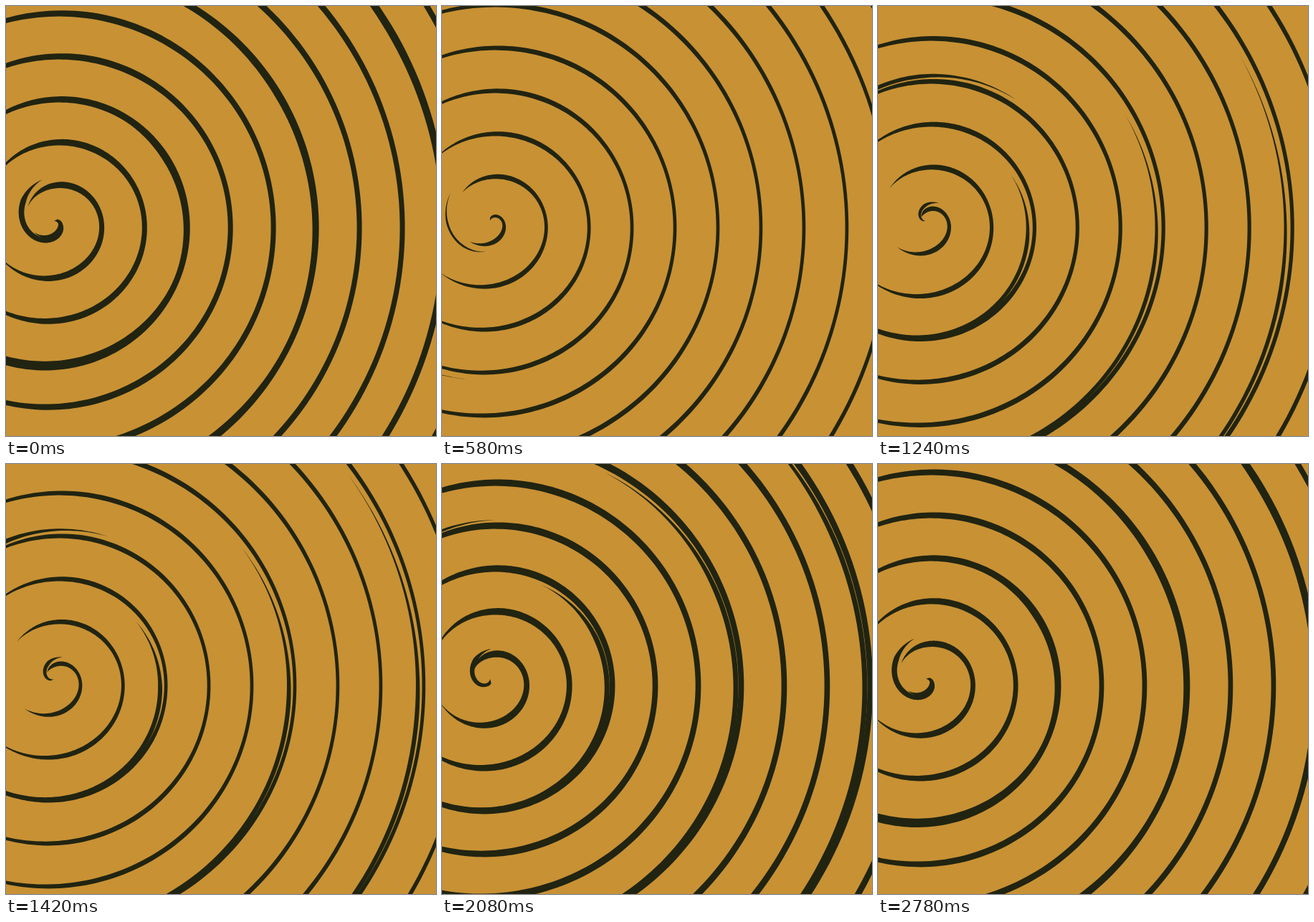
Recreate the animation shown at these times as an HTML page with a canvas. Size 600 by 600 pixels, loop 2800 ms.

```html
<!DOCTYPE html>
<html lang="en">
<head>
<meta charset="utf-8">
<title>Spiral</title>
<style>
  html, body { margin: 0; width: 100%; height: 100%; overflow: hidden; background: #c89134; }
  canvas { display: block; width: 100vw; height: 100vh; }
</style>
</head>
<body>
<canvas width="600" height="600"></canvas>
<script>
const ctx = document.querySelector('canvas').getContext('2d');
const GOLD = '#c89134', INK = '#212411';
const CX = 67, CY = 300, PITCH = 60, STEPS = 60, MAX_R = 690;

// step, line weight of the main spiral
const weights = [[0, 8.3], [13, 6], [26, 6.5], [35, 5.6], [44, 9], [50, 5], [59, 8], [60, 8.3]];

// step, start angle, start offset, end angle, end offset, weight of the drifting strand
const strands = [
  [26, -28, -12, 307, 8, 5.5],
  [35, -40, -10.5, 278, 7, 6.5],
  [44, -61, -10, 272, 7, 7],
  [50, -64, -7.5, 257, 8, 6],
  [60, -70, -5, 254, 12, 8],
  [73, 97, 8, 216, 13, 3]
];

function interpolate(table, x) {
  const next = table.findIndex(row => row[0] >= x);
  if (next === 0) return table[0].slice(1);
  if (next < 0) return table[table.length - 1].slice(1);
  const a = table[next - 1], b = table[next];
  const k = (x - a[0]) / (b[0] - a[0]);
  return a.slice(1).map((v, i) => v + (b[i + 1] - v) * k);
}

const cosDeg = deg => Math.cos(deg * Math.PI / 180);
const sinDeg = deg => Math.sin(deg * Math.PI / 180);

// Fills a ribbon along a spiral; inner radius and weight are functions of the angle in degrees.
function ribbon(from, to, innerRadius, weight) {
  const outer = [], inner = [];
  for (let deg = from; deg <= to; deg += 1.5) {
    const r = innerRadius(deg), w = Math.max(0, weight(deg));
    if (r + w / 2 < 1) continue;
    const point = d => [CX + cosDeg(deg) * d, CY + sinDeg(deg) * d];
    outer.push(point(r + w));
    inner.push(point(Math.max(0, r)));
  }
  ctx.beginPath();
  outer.concat(inner.reverse()).forEach(p => ctx.lineTo(...p));
  ctx.fill();
}

function draw(step) {
  ctx.fillStyle = GOLD;
  ctx.fillRect(0, 0, 600, 600);
  ctx.fillStyle = INK;

  const base = 65.7 + step;
  const [weight] = interpolate(weights, step);
  // The inner edge keeps its shape; only the outer edge swells.
  const edge = deg => -5.4 - 2.9 * cosDeg(deg) + 5.1 * cosDeg(deg) ** 2;
  const thickness = deg => weight + 4.5 * cosDeg(deg) - 5.8 * cosDeg(deg) ** 2;
  // One turn at a time, so that each ribbon stays a simple band.
  for (let turn = -3; base + turn * PITCH < MAX_R; turn++) {
    ribbon(-171, 190.5, deg => base + PITCH * (turn + deg / 360) + edge(deg), thickness);
  }

  // The strand drifts across every third turn and starts over at step 20.
  const age = step < 20 ? step + STEPS : step;
  const [start, low, end, high, strandWeight] = interpolate(strands, age);
  const offset = deg => low + (high - low) * (deg - start) / (end - start);
  const taper = deg => strandWeight * Math.min(1, (deg - start) / 40, (end - deg) / 40);
  for (let r0 = 125.7 + age - 6 * PITCH; r0 < MAX_R; r0 += 3 * PITCH) {
    ribbon(start, end, deg => r0 + PITCH * deg / 360 + offset(deg) - taper(deg) / 2, taper);
  }
}

// Steps come in threes lasting 20, 100 and 20 ms.
function stepAt(ms) {
  const t = ms % 2800, rest = t % 140;
  return Math.floor(t / 140) * 3 + (rest < 20 ? 0 : rest < 120 ? 1 : 2);
}

const begin = performance.now();
function tick() {
  draw(stepAt(Math.max(0, performance.now() - begin)));
  requestAnimationFrame(tick);
}
tick();
</script>
</body>
</html>
```
